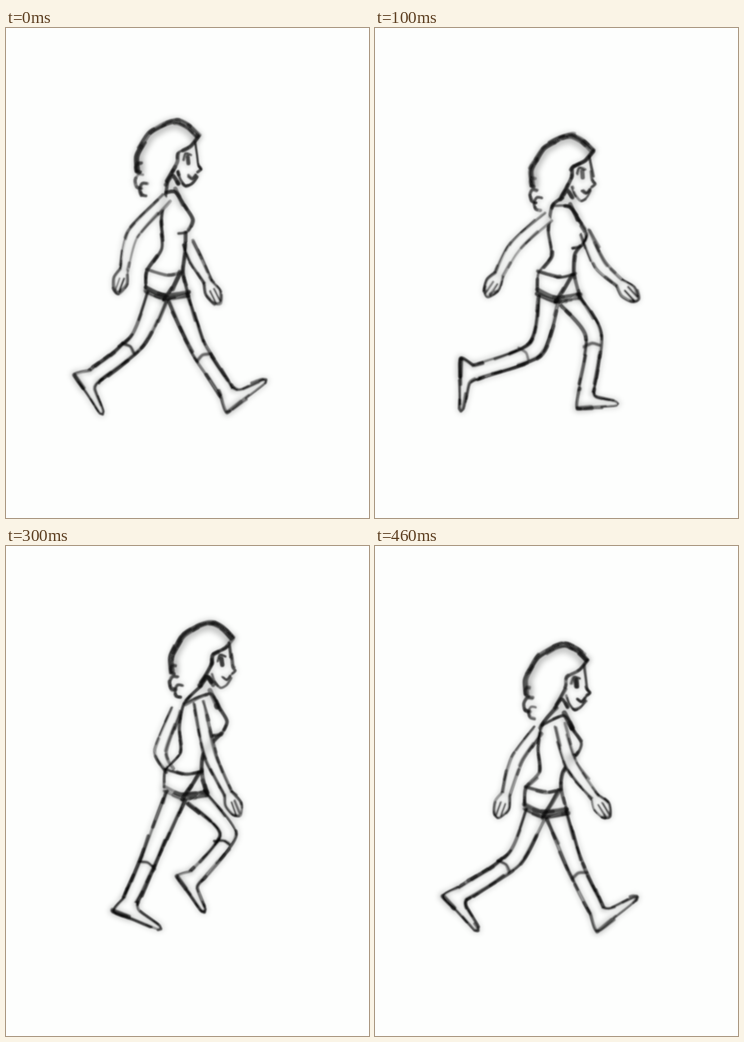
Write an HTML page that moves like this. It is 644 px wide and 870 px high and loops after 0.5 s.

```html
<!DOCTYPE html>
<html lang="en">
<head>
<meta charset="utf-8">
<title>Walk cycle</title>
<style>
html, body { margin: 0; width: 100%; height: 100%; overflow: hidden; background: #fdfefd; }
svg { display: block; width: 100vw; height: 100vh; }
path { fill: none; stroke: #0a0a0a; stroke-linecap: round; stroke-linejoin: round; }
.skin { fill: #fdfefd; stroke: none; }
</style>
</head>
<body>
<svg id="stage" viewBox="0 0 644 870">
  <defs>
    <filter id="soft" x="0" y="0" width="644" height="870" filterUnits="userSpaceOnUse"><feGaussianBlur stdDeviation="4"/></filter>
    <filter id="pen" x="0" y="0" width="644" height="870" filterUnits="userSpaceOnUse"><feGaussianBlur stdDeviation=".8"/></filter>
  </defs>
</svg>
<script>
const NS = 'http://www.w3.org/2000/svg';
const stage = document.getElementById('stage');
const STEP = 100;

let seed, lines, haze;
const rnd = () => (seed = (seed * 16807) % 2147483647) / 2147483647;
const shake = r => (rnd() * 2 - 1) * r;

const plus = (a, b, k = 1) => [a[0] + b[0] * k, a[1] + b[1] * k];
const mix = (a, b, t) => [a[0] + (b[0] - a[0]) * t, a[1] + (b[1] - a[1]) * t];
const gap = (a, b) => Math.hypot(b[0] - a[0], b[1] - a[1]);
const unit = (a, b) => plus([0, 0], plus(b, a, -1), 1 / gap(a, b));
const left = d => [-d[1], d[0]];
const points = (text, o = [0, 0]) => text.split(' ').map(q => plus(q.split(',').map(Number), o));

function add(parent, tag, attrs) {
  const el = document.createElementNS(NS, tag);
  for (const k in attrs) el.setAttribute(k, attrs[k]);
  return parent.appendChild(el);
}

const trace = pts => 'M' + pts.map(p => p.map(v => v.toFixed(1))).join('L');
const line = (parent, pts, width, alpha) =>
  add(parent, 'path', { d: trace(pts), 'stroke-width': width, 'stroke-opacity': alpha });
const skin = pts => add(lines, 'path', { d: trace(pts) + 'Z', class: 'skin' });

// Samples a tight Catmull-Rom curve about every 4 px
function smooth(p) {
  const out = [];
  for (let i = 0; i < p.length - 1; i++) {
    const b = p[i], c = p[i + 1], a = p[i - 1] || b, e = p[i + 2] || c;
    const n = Math.ceil(gap(b, c) / 4);
    for (let j = 0; j < n; j++) {
      const t = j / n, s = 1 - t;
      const c1 = plus(b, plus(c, a, -1), 1 / 8), c2 = plus(c, plus(e, b, -1), -1 / 8);
      out.push([0, 1].map(k => s ** 3 * b[k] + 3 * s * s * t * c1[k] + 3 * s * t * t * c2[k] + t ** 3 * c[k]));
    }
  }
  return [...out, p[p.length - 1]];
}

// A line built from overlapping translucent dabs, over a faint haze
function sketch(pts, w = 6, tone = .5) {
  const path = smooth(pts);
  line(haze, path, w * 2, tone * .2);
  for (const spread of [.8, 2.2]) {
    for (let i = 0; i < path.length - 1;) {
      const size = 5 + Math.floor(rnd() * 9);
      const from = [shake(spread), shake(spread)], to = [shake(spread), shake(spread)];
      const dab = path.slice(i, i + size + 3).map((p, j) => plus(p, mix(from, to, j / size)));
      if (spread < 1 || rnd() < .75) line(lines, dab, w * (.65 + rnd() * .4), tone * (.75 + rnd() * .4));
      i += size;
    }
  }
}

// Two edges at a given half width from a chain of joints
function edges(joints, half) {
  const side = s => joints.map((p, i) => {
    const d = unit(joints[Math.max(0, i - 1)], joints[Math.min(joints.length - 1, i + 1)]);
    return plus(p, left(d), s * half[i]);
  });
  return [side(1), side(-1)];
}

function limb(joints, half, w, tone) {
  const [a, b] = edges(joints, half);
  skin([...a, ...b.slice().reverse()]);
  sketch(a, w, tone);
  sketch(b, w, tone);
  return [a, b];
}

function arm(joints) {
  const [elbow, wrist] = joints.slice(-2);
  limb(joints, [9, 10, 7], 6, .46);
  if (gap(elbow, wrist) < 40) return; // hand is behind the body
  const d = unit(elbow, wrist), n = left(d);
  const at = (along, out) => plus(plus(wrist, d, along), n, out);
  const fist = [at(0, 7), at(18, 14), at(38, 9), at(44, -2), at(24, -13), at(0, -7)];
  skin(fist);
  sketch(fist, 5, .48);
  for (const out of [-5, 3]) sketch([at(16, out), at(40, out + 2)], 4, .42);
}

function leg(hip, [knee, heel, toe]) {
  const d = unit(heel, toe), up = left(d).map(v => -v);
  const ankle = plus(mix(heel, toe, .25), up, 28);
  const [back, front] = limb([hip, knee, ankle], [18, 14, 13], 7, .56);
  const cuff = [back, front].map(s => mix(s[1], s[2], .2));
  sketch([cuff[0], plus(mix(...cuff, .5), unit(ankle, knee), 5), cuff[1]], 6, .42);

  const instep = plus(mix(heel, toe, .5), up, 17);
  const shoe = [back[2], heel, mix(heel, toe, .45), toe, plus(toe, up, 7), instep, front[2]];
  skin(shoe);
  sketch(shoe, 6, .54);
  sketch([heel, mix(heel, toe, .35)], 9, .42);
}

function head(at) {
  const draw = (text, w, tone) => sketch(points(text, at), w, tone);
  const hair = points('232,254 230,228 238,210 254,185 282,168 304,163 325,173 343,191', at);
  const middle = plus([288, 232], at);
  line(haze, hair.map(p => mix(p, middle, .16)), 13, .16);
  for (const inset of [0, .07]) sketch(hair.map(p => mix(p, middle, inset)), 6, .48);

  draw('342,193 328,210 306,222 304,238 296,254 286,272', 7, .56);
  draw('336,202 339,226 341,244 346,251 340,256', 5, .5);
  draw('338,264 330,276 319,281 309,270 304,256', 5, .52);
  draw('322,229 323,240', 8, .6);
  draw('314,234 318,222 328,225', 4, .45);
  draw('324,262 331,267 337,260', 5, .6);
  draw('284,278 296,262 306,276', 8, .52);
  draw('301,286 314,314', 10, .55);

  // Curls at the nape
  for (const [x, y, r] of [[238, 272, 13], [246, 286, 12], [236, 248, 8]]) {
    const curl = [1, 2, 3, 4, 5].map(i => plus([x + r * .7 * Math.cos(i), y - r * Math.sin(i)], at));
    sketch(curl, 6, .43);
  }
}

function torso({ head: at, nape, pelvis }) {
  const waist = plus(mix(nape, pelvis, .57), [13, 0]);
  const hip = (x, y) => plus(pelvis, [x, y]);
  const chest = text => points(text, at);
  sketch([...chest('286,276'), nape, plus(mix(nape, waist, .5), [-16, 0]), plus(waist, [-21, 0]), hip(-36, -34), hip(-38, -4)], 6, .52);
  sketch([nape, ...chest('300,291 318,318 331,341 322,361 306,365')], 6, .5);
  sketch([...chest('320,362'), plus(waist, [21, 0]), hip(28, -32), hip(37, 6)], 7, .55);
  sketch([hip(-36, -36), hip(0, -26), hip(28, -31)], 6, .46);
  sketch([hip(24, -30), hip(10, -6), hip(-6, 18)], 8, .56);
  for (const y of [0, 7]) sketch([hip(-38, y - 4), hip(-6, y + 9), hip(38, y + 4)], 8, .42);
}

const poses = [
  { head: [0, 0], nape: [284, 292], pelvis: [286, 465], near: 'back',
    arms: { back: '285,302 225,366 209,429', front: '323,382 336,410 358,451' },
    legs: { back: '232,556 122,616 166,684', front: '342,570 392,682 460,630' } },
  { head: [45, 26], nape: [314, 316], pelvis: [326, 469], near: 'back',
    arms: { back: '307,335 248,388 220,438', front: '373,364 400,421 434,453' },
    legs: { back: '284,570 152,588 150,676', front: '388,545 359,675 428,670' } },
  { head: [15, 2], nape: [264, 304], pelvis: [286, 447], near: 'back',
    arms: { back: '282,308 281,390 286,460', front: '310,385 312,412 320,455' },
    legs: { back: '266,572 237,685 306,684', front: '306,552 208,562 200,626' } },
  { head: [61, -29], nape: [316, 280], pelvis: [319, 432], near: 'front',
    arms: { back: '302,292 274,364 290,398', front: '342,278 362,372 395,440' },
    legs: { back: '256,550 190,648 270,680', front: '394,512 304,586 347,648' } },
  { head: [35, 10], nape: [296, 318], pelvis: [303, 464], near: 'front',
    arms: { back: '289,328 252,378 232,440', front: '328,318 348,388 390,446' },
    legs: { back: '246,556 120,622 178,682', front: '356,570 394,684 464,628' } }
];

const frames = poses.map(pose => {
  const g = add(stage, 'g', {});
  lines = add(g, 'g', { filter: 'url(#pen)' });
  haze = add(g, 'g', { filter: 'url(#soft)' });
  seed = 11;
  const far = pose.near === 'back' ? 'front' : 'back';
  arm(points(pose.arms[far]));
  leg(plus(pose.pelvis, [19, 14]), points(pose.legs.front));
  leg(plus(pose.pelvis, [-18, 12]), points(pose.legs.back));
  torso(pose);
  arm(points(pose.arms[pose.near]));
  head(pose.head);
  return g;
});

function show(t) {
  const now = Math.floor(t / STEP) % frames.length;
  frames.forEach((g, i) => g.setAttribute('display', i === now ? 'inline' : 'none'));
}

const start = performance.now();
function tick() {
  show(performance.now() - start);
  requestAnimationFrame(tick);
}
tick();
</script>
</body>
</html>
```
